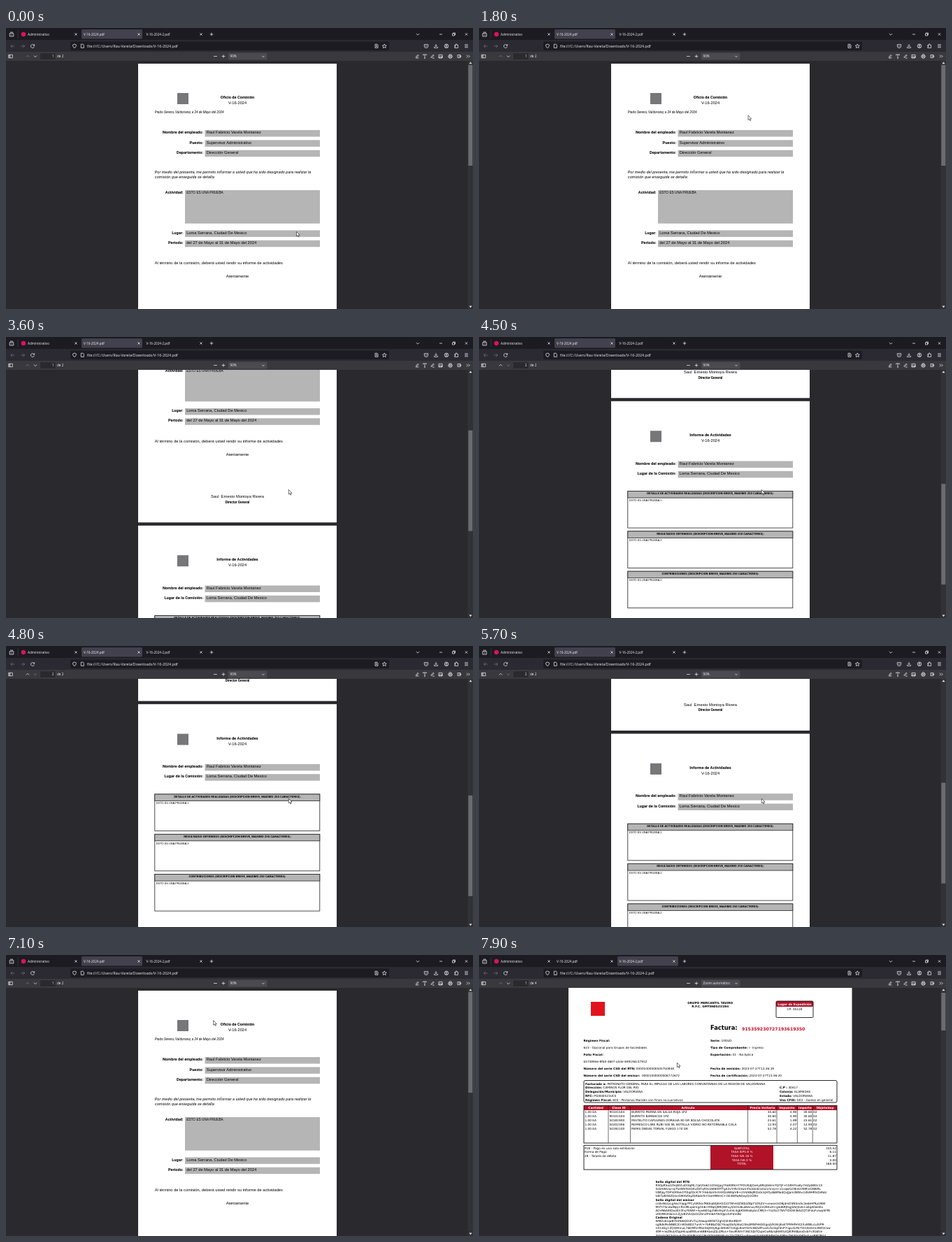
These frames come from a looping animation (668x402 px, 8 s). An HTML page:

```html
<!DOCTYPE html>
<html lang="es">
<head>
<meta charset="utf-8">
<style>
html, body { margin: 0; width: 100%; height: 100%; overflow: hidden; background: #2a2a2e; }
svg { display: block; }
text { white-space: pre; }
.ui { font-family: "Open Sans", "Noto Sans", sans-serif; fill: #f4f4f8; }
.ar { font-family: "Liberation Sans", Arial, sans-serif; }
.ro { font-family: Roboto, sans-serif; }
.dv { font-family: "DejaVu Sans", sans-serif; }
.b { font-weight: 700; }
.i { font-style: italic; }
.w { fill: #fff; }
.m { text-anchor: middle; }
.e { text-anchor: end; }
.ico { fill: none; stroke: #e4e4ea; stroke-width: .8; }
.dim { opacity: .35; }
</style>
</head>
<body>
<svg id="stage" width="668" height="402" viewBox="0 0 668 402"></svg>
<script>
const text = (x, y, size, cls, str, id = '') =>
  `<text x="${x}" y="${y}" font-size="${size}" class="${cls}" ${id && `id="${id}"`}>${str}</text>`;
const box = (x0, y0, x1, y1, fill, extra = '') =>
  `<rect x="${x0}" y="${y0}" width="${x1 - x0}" height="${y1 - y0}" fill="${fill}" ${extra}/>`;
const icon = (x, y, d, extra = '') =>
  `<path class="ico" transform="translate(${x} ${y})" d="${d}" ${extra}/>`;

const cross = 'M-1.6-1.6 1.6 1.6M1.6-1.6-1.6 1.6';
const plus = 'M-2.3 0H2.3M0-2.3V2.3';
const down = 'M-2.2-1 0 1.2 2.2-1';
const up = 'M-2.2 1 0-1.2 2.2 1';
const square = 'M-2-2H2V2H-2Z';
const sheet = 'M-2-2.6H1L2-1.4V2.6H-2Z';

/* ---------- Comisión ---------- */
const GRAY = '#b5b5b5';
const field = (y, x, label, value, size = 5.72, h = 9.5) =>
  box(x, y, 449, y + h, GRAY) +
  text(x - 2.5, y + 5.2, 5.7, 'ro b e', label) +
  text(x + 2.2, y + 5.2, size, 'ar', value);
const heading = (y, title) =>
  box(245, y - 8, 261, y + 8, '#77777a') +
  text(331, y, 5.7, 'ro b m', title) + text(331, y + 8, 5.7, 'ar m', 'V-16-2024');
const table = (y, title, value) =>
  box(212.8, y, 448.8, y + 52.5, '#fff', 'stroke="#222" stroke-width=".8"') +
  box(212.8, y, 448.8, y + 9.5, GRAY, 'stroke="#222" stroke-width=".8"') +
  text(331, y + 4.8, 4.3, 'ro b m', title + ' (DESCRIPCION BREVE, MAXIMO 250 CARACTERES):') +
  text(215, y + 14.2, 3.93, 'ar', value);

const person = 'Raul Fabricio Varela Montanez', place = 'Loma Serrana, Ciudad De Mexico';
const order = box(189, 51, 473, 452.7, '#fff') + box(189, 457.2, 473, 858, '#fff') +
  heading(101, 'Oficio de Comisión') +
  text(212.8, 121.7, 4.7, 'ro i', 'Prado Sereno, Valdoriana; a 24 de Mayo del 2024') +
  field(146, 284.5, 'Nombre del empleado:', person) +
  field(160.3, 284.5, 'Puesto:', 'Supervisor Administrativo') +
  field(174.7, 284.5, 'Departamento:', 'Dirección General') +
  text(212.8, 208.4, 5.7, 'ro i', 'Por medio del presente, me permito informar a usted que ha sido designado para realizar la') +
  text(212.8, 214.9, 5.7, 'ro i', 'comisión que enseguida se detalla:') +
  field(232, 256, 'Actividad:', 'ESTO ES UNA PRUEBA', 4.77, 47.7) +
  field(289.4, 256, 'Lugar:', place) +
  field(303.7, 256, 'Periodo:', 'del 27 de Mayo al 31 de Mayo del 2024') +
  text(212.8, 338.4, 5.72, 'ar', 'Al término de la comisión, deberá usted rendir su informe de actividades') +
  text(331, 357.4, 5.72, 'ar m', 'Atentamente') +
  text(331, 417.4, 5.72, 'ar m', 'Saul  Ernesto Montoya Rivera') +
  text(331, 425.2, 4.75, 'ro b m', 'Director General') +
  heading(507.6, 'Informe de Actividades') +
  field(542.9, 284.5, 'Nombre del empleado:', person) +
  field(557.2, 284.5, 'Lugar de la Comisión:', place) +
  table(586, 'DETALLE DE ACTIVIDADES REALIZADAS', 'ESTO ES UNA PRUEBA 1') +
  table(643.3, 'RESULTADOS OBTENIDOS', 'ESTO ES UNA PRUEBA 3') +
  table(700.6, 'CONTRIBUCIONES', 'ESTO ES UNA PRUEBA 2');

/* ---------- Factura ---------- */
const RED = '#b01228', S = 4.25;
const dv = (x, y, str, cls = '') => text(x, y, S, 'dv ' + cls, str);
const pair = (x, y, label, value) =>
  dv(x, y, `<tspan class="b">${label}:</tspan> ${value}`);
const frame = (x0, y0, x1, y1, r = 0) =>
  box(x0, y0, x1, y1, 'none', `stroke="#111" stroke-width=".9" rx="${r}"`);

let seed = 7;
const alphabet = 'ABCDEFGHIJKLMNOPQRSTUVWXYZabcdefghijklmnopqrstuvwxyz0123456789+/';
const cipher = n => Array.from({ length: n }, () =>
  alphabet[(seed = seed * 16807 % 2147483647) % 64]).join('');
const seal = (row, title, lengths) => dv(252.5, 326 + row * 5.1, title, 'b') +
  lengths.map((n, k) => dv(252.5, 326 + (row + k + 1) * 5.1, cipher(n))).join('');

const items = [
  ['90101504', 'BURRITO PIERNA EN SALSA ROJA 1PZ', '30.60', '4.90', '30.60'],
  ['90101504', 'BURRITO BARBACOA 1PZ', '30.60', '4.90', '30.60'],
  ['50181900', 'PASTELITO CAPULINES DORALVA 80 GR BOLSA CHOCOLATE', '23.61', '1.89', '23.61'],
  ['50202306', 'REFRESCO LIMA RUBI 500 ML BOTELLA VIDRIO NO RETORNABLE COLA', '12.93', '2.07', '12.93'],
  ['50192100', 'PAPAS ONDAS TORVAL FUEGO 170 GR', '52.78', '4.22', '52.78']
].map(([code, name, price, tax, sum], k) => {
  const y = 226.4 + k * 5.8;
  return dv(151.5, y, '1.00 EA') + dv(186.5, y, code) + dv(218, y, name) + dv(425, y, price, 'e') +
    dv(454.3, y, tax, 'e') + dv(476.3, y, sum, 'e') + dv(478.3, y, '02');
}).join('');
const columns = [['Cantidad', 167], ['Clave ID', 200], ['Artículo', 299], ['Precio Unitario', 405.5],
  ['Impuesto', 440.5], ['Importe', 466.3], ['ObjetoImp', 495]]
  .map(([name, x]) => dv(x, 220, name, 'b w m')).join('');
const totals = [['SUBTOTAL', '150.52'], ['TASA IEPS 8 %', '6.11'], ['TASA IVA 16 %', '11.87'],
  ['TASA IVA 0 %', '0.00'], ['TOTAL', '168.50']].map(([name, sum], k) =>
  dv(376, 277.6 + k * 5.7, name, 'w m') + dv(511, 277.6 + k * 5.7, sum, 'e')).join('');

const invoice = box(128, 47, 533.5, 402, '#fff') +
  box(160, 67, 180, 87, '#e1141e') +
  dv(330.7, 69.8, 'GRUPO MERCANTIL TAVIRO', 'b m') +
  dv(330.7, 75.4, 'R.F.C. GMT8605231N4', 'b m') +
  box(425, 66, 478, 74, RED, 'rx="1.5"') + frame(425, 66, 478, 89.5, 1.5) +
  dv(451.5, 71.6, 'Lugar de Expedición', 'b w m') + dv(451.5, 78.7, 'CP: 45128', 'm') +
  text(331, 107.4, 8.3, 'dv b', 'Factura:') +
  `<g fill="#c8142b">${text(376, 107.8, 6.2, 'dv b', '915359230727193619350')}</g>` +
  dv(149.5, 123.6, 'Régimen Fiscal:', 'b') +
  dv(149.5, 133.6, '623 - Opcional para Grupos de Sociedades') +
  dv(149.5, 143.8, 'Folio Fiscal:', 'b') +
  dv(149.5, 153.7, 'b573894e-8fb0-4607-a53e-84919dc37912') +
  pair(149.5, 163.6, 'Número del serie CSD del RTN', '00001000000505750848') +
  pair(149.5, 173.5, 'Número del serie CSD del emisor', ' 00001000000506772672') +
  pair(331, 123.6, 'Serie', '10GUD') +
  pair(331, 133.6, 'Tipo de Comprobante', 'I - Ingreso') +
  pair(331, 143.7, 'Exportación', '01 - No Aplica') +
  pair(331, 163.6, 'Fecha de emisión', '2023-07-27T12:36:19') +
  pair(331, 173.5, 'Fecha de certificación', '2023-07-27T13:36:20') +
  frame(150, 179.5, 512, 211, 2) +
  pair(152, 185.6, 'Facturado a', 'PATRONATO GENERAL PARA EL IMPULSO DE LAS LABORES COMUNITARIAS EN LA REGION DE VALDORIANA') +
  pair(152, 191.4, 'Dirección', 'CAMINOS FLOR DEL RIO') +
  pair(152, 197.1, 'Delegación/Municipio', 'VALDORIANA') +
  pair(152, 202.9, 'RFC', 'PGI840523UC5') +
  pair(152, 208.6, 'Régimen Fiscal', '603 - Personas Morales con Fines no Lucrativos') +
  pair(430, 191.4, 'C.P ', '30417') +
  pair(430, 197.1, 'Colonia', 'ALAMEDAS') +
  pair(430, 202.9, 'Estado', 'VALDORIANA') +
  pair(430, 208.6, 'Uso CFDI', 'G03 - Gastos en general') +
  box(150, 215.3, 512, 222, RED) + frame(150, 215.3, 512, 269) + columns +
  '<path d="M185 215V269M216.5 215V269M384.5 215V269M426 215V269M455.3 215V269M477.2 215V269" stroke="#111" stroke-width=".6"/>' +
  items + box(331, 272.3, 421, 307, RED) + frame(150, 272.3, 512, 307) +
  dv(151, 277.6, 'PUE - Pago en una sola exhibición') + dv(151, 283.3, 'Forma de Pago') +
  dv(151, 289, '28 - Tarjeta de débito') + totals +
  seal(0, 'Sello digital del RTN', [92, 92, 92, 52]) +
  seal(5, 'Sello digital del emisor', [92, 92, 92, 46]) +
  seal(10, 'Cadena Original', [46, 92, 92, 92, 92]);

/* ---------- Browser ---------- */
const browser = box(0, 0, 668, 17.2, '#1c1b22') + box(0, 17, 668, 34.3, '#2b2a33') +
  box(0, 34, 668, 47, '#38383d') +
  `<rect id="tab" x="108" y="2" width="87" height="13.5" rx="1.5" fill="#42414d"/>` +
  icon(8, 9, 'M-2.8-1.4H2.8V3H-2.8ZM-2-2.9H2M-1 .4 0 1.4 1 .4') +
  '<path d="M17 3V15" stroke="#45444e" stroke-width=".6"/><circle cx="25" cy="9" r="3.2" fill="#e0115f"/>' +
  text(31, 10.7, 4.6, 'ui', 'Administrativo') +
  text(111, 10.7, 4.6, 'ui', 'V-16-2024.pdf') +
  text(200.5, 10.7, 4.6, 'ui', 'V-16-2024-2.pdf') +
  [100, 190, 279].map(x => icon(x, 9, cross)).join('') +
  icon(294, 9, plus) + icon(589, 9, down) + icon(622, 9, 'M-2 0H2') +
  icon(640.5, 9, 'M-2-1H1V2H-2ZM-1-1V-2H2V1H1') + icon(658.5, 9, cross) +
  box(92, 19.5, 548, 32, '#1c1b22', 'rx="1.8"') +
  icon(9.5, 26, 'M2.8 0H-2.6M-.2-2.4-2.6 0-.2 2.4', 'opacity=".35"') +
  icon(24, 26, 'M-2.8 0H2.6M.2-2.4 2.6 0 .2 2.4', 'opacity=".35"') +
  icon(38, 26, 'M2.3-1A2.5 2.5 0 1 0 2.4 .8M2.7-2.8V-.8H.7') +
  icon(98, 25.8, 'M0-2.8 2.4-1.8C2.4 1 1.5 2 0 2.8-1.5 2-2.4 1-2.4-1.8Z') +
  icon(109.3, 25.8, sheet) +
  text(116, 27.8, 5.3, 'ui', '', 'url') +
  icon(530, 25.8, sheet + 'M-1-.8H1M-1 .6H1') +
  icon(541.3, 25.8, 'M0-2.9 .9-.9 3-.7 1.4 .7 1.9 2.8 0 1.7-1.9 2.8-1.4 .7-3-.7-.9-.9Z') +
  icon(601, 25.8, 'M-2.7-2.2H2.7V0A2.7 2.7 0 0 1-2.7 0ZM-1.2-.6 0 .6 1.2-.6') +
  icon(615, 25.8, 'M0-2.8V1M-1.6-.6 0 1 1.6-.6M-2.5 1V2.6H2.5V1') +
  icon(630, 25.8, 'M2.8 0A2.8 2.8 0 1 1-2.8 0 2.8 2.8 0 1 1 2.8 0M1-.8A1 1 0 1 1-1-.8 1 1 0 1 1 1-.8M-1.8 1.8Q0 .4 1.8 1.8') +
  icon(644.3, 25.8, 'M-2.5-1.4H-.9V-2.7H.7V-1.4H2.3V2.6H-2.5V1H-1.3V-.2H-2.5Z') +
  icon(658.5, 25.8, 'M-2.4-2H2.4M-2.4 0H2.4M-2.4 2H2.4') +
  icon(6.5, 40.5, 'M-2.8-2.2H2.8V2.2H-2.8ZM-.8-2.2V2.2M-2.2-.8H-1.2M-2.2 .6H-1.2') +
  icon(31, 40.5, up, 'id="prev"') + icon(42, 40.5, down, 'id="next"') +
  box(48.5, 35.7, 71, 45.5, '#2a2a2e', 'rx=".8" stroke="#4c4c52" stroke-width=".4"') +
  text(68.5, 42.3, 4.7, 'ui e', '', 'num') + text(73, 42.3, 4.7, 'ui', '', 'count') +
  icon(299.5, 40.5, 'M-2.4 0H2.4') + icon(311, 40.5, plus) +
  box(318, 35.7, 373.5, 45.5, '#4a4a4f', 'rx=".8"') +
  text(320.5, 42.2, 4.65, 'ui', '', 'zoom') + icon(368, 40.6, 'M-1.6-.7 0 .9 1.6-.7') +
  icon(588, 40.5, 'M-2.2 2.4H2.4M-1.6 1 1-2.2 2.2-1-.6 1.6Z') +
  icon(599, 40.5, 'M-2.5-1.4V-2.5H2.5V-1.4M0-2.5V2.6M-1 2.6H1') +
  icon(610, 40.5, 'M-2.2 1.4 1.2-2.4 2.2-1.3-1 2ZM0 2.6H2.6') +
  icon(621.5, 40.5, 'M-2.5-2.2H2.5V2.2H-2.5ZM-2.5 1.6-.6-.4 1 1 2.5-.2V2.2H-2.5Z') +
  icon(635.5, 40.5, 'M-1.5-.8V-2.6H1.5V-.8M-1.5 1.4H-2.6V-.8H2.6V1.4H1.5M-1.5 .5H1.5V2.6H-1.5Z') +
  icon(648, 40.5, square + 'M-.6 0H3M1.8-1.2 3 0 1.8 1.2') +
  icon(661, 40.5, 'M-2.2-1.8-.4 0-2.2 1.8M.4-1.8 2.2 0 .4 1.8') +
  box(660.5, 47, 668, 402, '#323236') + box(661.3, 53, 667.3, 197, '#6c6c70', 'id="thumb"') +
  '<path d="M662.4 51.2H666.6L664.5 48.6ZM662.4 397.6H666.6L664.5 400.2Z" fill="#e0e0e4"/>';

const stage = document.getElementById('stage');
stage.innerHTML = box(0, 0, 668, 402, '#2a2a2e') +
  `<g id="order">${order}</g><g id="invoice">${invoice}</g>${browser}` +
  '<path id="cursor" d="M0 0V6.6L1.5 5.3 2.6 7.7 3.7 7.2 2.7 4.9H4.7Z" fill="#fff" stroke="#111" stroke-width=".6"/>';
const el = {};
for (const node of stage.querySelectorAll('[id]')) el[node.id] = node;

/* ---------- Motion: [time, ...values] ---------- */
const scrolling = [[2800, 0], [2900, 36], [3000, 73], [3400, 132], [3600, 187.4], [3700, 247], [4000, 247],
  [4100, 268], [4300, 330], [4500, 365.4], [4700, 374], [5600, 374], [5700, 331.7], [6300, 95.3], [6500, 0]];
const pointer = [[200, 415.5, 291.3], [600, 437.5, 281], [1400, 437.5, 281], [1600, 436, 225], [1800, 385, 125],
  [1950, 320, 80], [2050, 280, 78], [2200, 249, 105], [2300, 287, 139], [2600, 335.3, 180.5],
  [3000, 335.3, 180.5], [3500, 404.3, 218.4], [5700, 404.3, 218.2], [6000, 404.3, 220.6],
  [6800, 404.3, 220.6], [7300, 225, 9], [7700, 209, 5], [7900, 283.4, 154]];
const SWITCH = 7400;

function at(keys, t) {
  const k = keys.findIndex(key => key[0] > t);
  if (k < 1) return (k ? keys[keys.length - 1] : keys[0]).slice(1);
  const a = keys[k - 1], b = keys[k], f = (t - a[0]) / (b[0] - a[0]);
  return a.slice(1).map((v, j) => v + (b[j + 1] - v) * f);
}

function draw(now) {
  const t = Math.floor(now % 8000 / 100) * 100;
  const second = t >= SWITCH, [scroll] = at(scrolling, t), page = scroll > 215 ? 2 : 1;
  el.order.setAttribute('transform', `translate(0 ${-scroll})`);
  el.order.style.display = second ? 'none' : '';
  el.invoice.style.display = second ? '' : 'none';
  el.tab.setAttribute('x', second ? 198 : 108);
  el.url.textContent = `file:///C:/Users/Rau-Varela/Downloads/V-16-2024${second ? '-2' : ''}.pdf`;
  el.num.textContent = page;
  el.count.textContent = second ? 'de 4' : 'de 2';
  el.zoom.textContent = second ? 'Zoom automático' : '90%';
  el.prev.style.opacity = page > 1 ? 1 : .4;
  el.next.style.opacity = page > 1 ? .4 : 1;
  el.thumb.setAttribute('y', second ? 54 : 53 + scroll * .43);
  el.thumb.setAttribute('height', second ? 54 : 144);
  el.cursor.setAttribute('transform', `translate(${at(pointer, t).join(' ')})`);
  requestAnimationFrame(draw);
}
draw(0);
</script>
</body>
</html>
```
